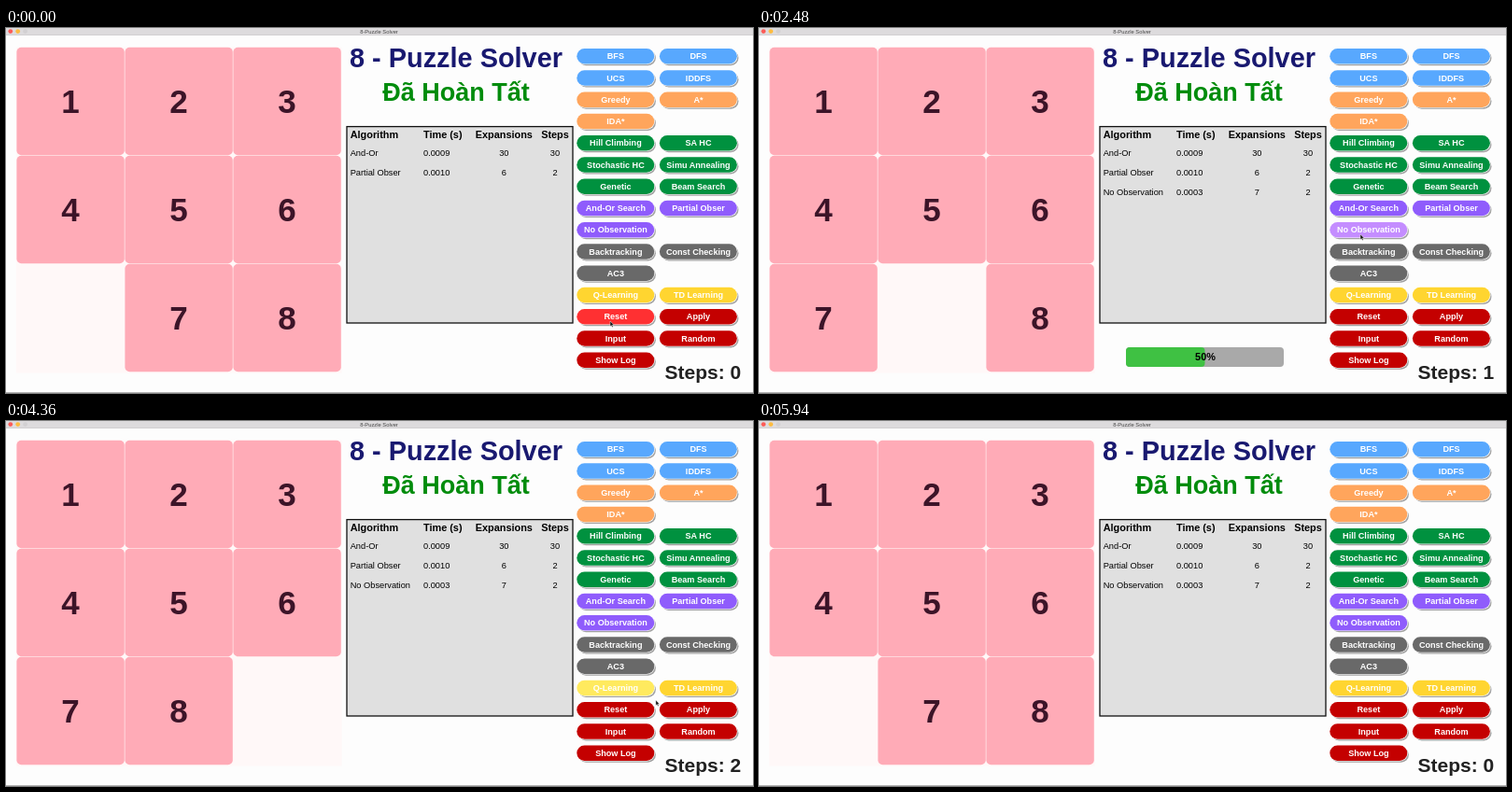
Animation, 800 px wide and 391 px high, one loop 5.97 s. Source, as an HTML page:

```html
<!DOCTYPE html>
<html lang="en">
<head>
<meta charset="utf-8">
<title>8-Puzzle Solver</title>
<style>
  html, body { margin: 0; width: 100%; height: 100%; overflow: hidden; background: #fdfdfd; }
  svg { display: block; width: 100vw; height: 100vh; font-family: "Liberation Sans", Arial, sans-serif; }
</style>
</head>
<body>
<svg id="stage" viewBox="0 0 800 391"></svg>
<script>
const LOOP = 5970;
const HOVER_LAG = 110;
const SOLVE_START = 1880, STEP_ONE = 2330, STEP_TWO = 2800, RESET = 4900;
const stage = document.getElementById("stage");

function add(tag, attrs, parent = stage) {
  const node = document.createElementNS("http://www.w3.org/2000/svg", tag);
  for (const key in attrs) node.setAttribute(key, attrs[key]);
  parent.appendChild(node);
  return node;
}

function rect(x, y, width, height, fill, rx = 0, parent = stage) {
  return add("rect", { x, y, width, height, fill, rx }, parent);
}

// y is the vertical centre of the capitals
function label(str, x, y, size, { fill = "#000", bold = true, anchor = "middle", parent = stage } = {}) {
  const node = add("text", {
    x, y: y + size * 0.36, fill, "font-size": size,
    "font-weight": bold ? 700 : 400, "text-anchor": anchor
  }, parent);
  node.textContent = str;
  return node;
}

function show(node, visible) {
  node.setAttribute("visibility", visible ? "visible" : "hidden");
}

// Window frame
rect(0, 0, 800, 391, "#fdfdfd");
rect(0, 0, 800, 7.6, "#dddbdd");
rect(0, 7.2, 800, 0.6, "#c4c2c4");
rect(0, 390, 800, 1, "#b4b4b4");
["#fc5b57", "#fdbc40", "#d2d0d2"].forEach((fill, i) =>
  add("circle", { cx: 4.8 + i * 7.9, cy: 3.6, r: 2.4, fill }));
label("8-Puzzle Solver", 399.5, 3.7, 5.8, { fill: "#444", bold: false });

// Board
const TILE = 116;
rect(11, 20.5, 348.5, 349, "#fff8f8");
const tiles = Array.from({ length: 8 }, (_, i) => {
  const group = add("g", {});
  rect(0, 0, 115.4, 115.4, "#ffabb7", 5, group);
  label(i + 1, 57.5, 57.8, 35, { fill: "#3c1428", parent: group });
  return group;
});

function place(tile, slot) {
  const x = 11.4 + TILE * (slot % 3), y = 20.8 + TILE * Math.floor(slot / 3);
  tile.setAttribute("transform", `translate(${x} ${y})`);
}
tiles.slice(0, 6).forEach(place);

// Headings
label("8 - Puzzle Solver", 482, 31.5, 28.9, { fill: "#191970" });
label("Đã Hoàn Tất", 482, 68, 27, { fill: "#008c0c" });

// Results table
add("rect", { x: 365, y: 105.6, width: 242, height: 210.4, fill: "#e0e0e0", stroke: "#111", "stroke-width": 1.3 });

function tableRow(cells, y, size, bold) {
  const group = add("g", {});
  [[368.7, "start"], [447, "start"], [533.3, "middle"], [588, "middle"]].forEach(([x, anchor], i) =>
    label(cells[i], x, y, size, { bold, anchor, parent: group }));
  return group;
}
tableRow(["Algorithm", "Time (s)", "Expansions", "Steps"], 113.6, 10.9, true);
tableRow(["And-Or", "0.0009", "30", "30"], 133.3, 9.25, false);
tableRow(["Partial Obser", "0.0010", "6", "2"], 154.6, 9.25, false);
const newRow = tableRow(["No Observation", "0.0003", "7", "2"], 175.8, 9.25, false);

// Progress bar
const progress = add("g", {});
rect(393, 342, 169, 21, "#a9a9a9", 4, progress);
const progressFill = rect(393, 342, 0, 21, "#3fc143", 4, progress);
const progressText = label("", 478, 352.3, 10.9, { parent: progress });

// Buttons: [normal, hovered] colours
const COLORS = {
  blue: ["#58a8fe", "#86c2ff"],
  orange: ["#ffa55c", "#ffb978"],
  green: ["#00913f", "#2fb064"],
  purple: ["#8f5cfc", "#c48dff"],
  gray: ["#696969", "#919191"],
  yellow: ["#ffd530", "#ffea5e"],
  red: ["#c40000", "#ff3032"]
};
const ROWS = [
  ["blue", "BFS", "DFS"], ["blue", "UCS", "IDDFS"],
  ["orange", "Greedy", "A*"], ["orange", "IDA*"],
  ["green", "Hill Climbing", "SA HC"], ["green", "Stochastic HC", "Simu Annealing"], ["green", "Genetic", "Beam Search"],
  ["purple", "And-Or Search", "Partial Obser"], ["purple", "No Observation"],
  ["gray", "Backtracking", "Const Checking"], ["gray", "AC3"],
  ["yellow", "Q-Learning", "TD Learning"],
  ["red", "Reset", "Apply"], ["red", "Input", "Random"], ["red", "Show Log"]
];
const buttons = ROWS.flatMap(([color, ...names], row) => names.map((name, col) => {
  const x = 611.3 + col * 88.6, y = 22 + row * 23.25, w = 83, h = 16.4;
  rect(x + 1.6, y + 1.8, w, h, "#a2a2a2", 8.2);
  rect(x - 0.2, y - 0.2, w + 0.8, h + 0.8, "#fff", 8.4);
  const face = rect(x, y, w, h, COLORS[color][0], 8.2);
  label(name, x + 41.6, y + 8.2, 9.1, { fill: "#fff" });
  return { x, y, w, h, face, colors: COLORS[color] };
}));

const steps = label("", 787.3, 368.8, 21, { fill: "#222", anchor: "end" });

const cursor = add("path", {
  d: "M0 0V5.6L1.3 4.5L2.2 6.5L3.2 6L2.3 4.1H4Z",
  fill: "#111", stroke: "#fff", "stroke-width": 0.5, "stroke-opacity": 0.8
});

// Pointer path: [time, x, y]
const PATH = [
  [0, 647, 314], [940, 648, 313], [1250, 648, 313], [1600, 644, 221], [3100, 644, 221],
  [3460, 660, 240], [3580, 668, 255], [4000, 684, 284], [4240, 690, 290], [4360, 696, 299],
  [4620, 664, 310], [4930, 655, 310], [5040, 648, 216], [5150, 643, 92], [5260, 640, -20]
];

function pointerAt(t) {
  const next = PATH.findIndex(key => key[0] > t);
  if (next < 0) return PATH[PATH.length - 1].slice(1);
  if (next === 0) return PATH[0].slice(1);
  const [t0, x0, y0] = PATH[next - 1], [t1, x1, y1] = PATH[next];
  const k = (t - t0) / (t1 - t0);
  return [x0 + (x1 - x0) * k, y0 + (y1 - y0) * k];
}

function render(t) {
  const moved = t >= RESET || t < STEP_ONE ? 0 : t < STEP_TWO ? 1 : 2;
  place(tiles[6], moved > 0 ? 6 : 7);
  place(tiles[7], moved > 1 ? 7 : 8);
  steps.textContent = `Steps: ${moved}`;

  show(newRow, t >= SOLVE_START);
  show(progress, t >= SOLVE_START && t < STEP_TWO + 60);
  progressFill.setAttribute("width", 169 * moved / 2);
  progressText.textContent = `${moved * 50}%`;

  const [x, y] = pointerAt(t);
  cursor.setAttribute("transform", `translate(${x} ${y})`);
  const [hx, hy] = pointerAt(t - HOVER_LAG);
  for (const b of buttons) {
    const hovered = hx >= b.x && hx <= b.x + b.w && hy >= b.y && hy <= b.y + b.h;
    b.face.setAttribute("fill", b.colors[hovered ? 1 : 0]);
  }
}

const start = performance.now();
function frame() {
  render((performance.now() - start) % LOOP);
  requestAnimationFrame(frame);
}
frame();
</script>
</body>
</html>
```
